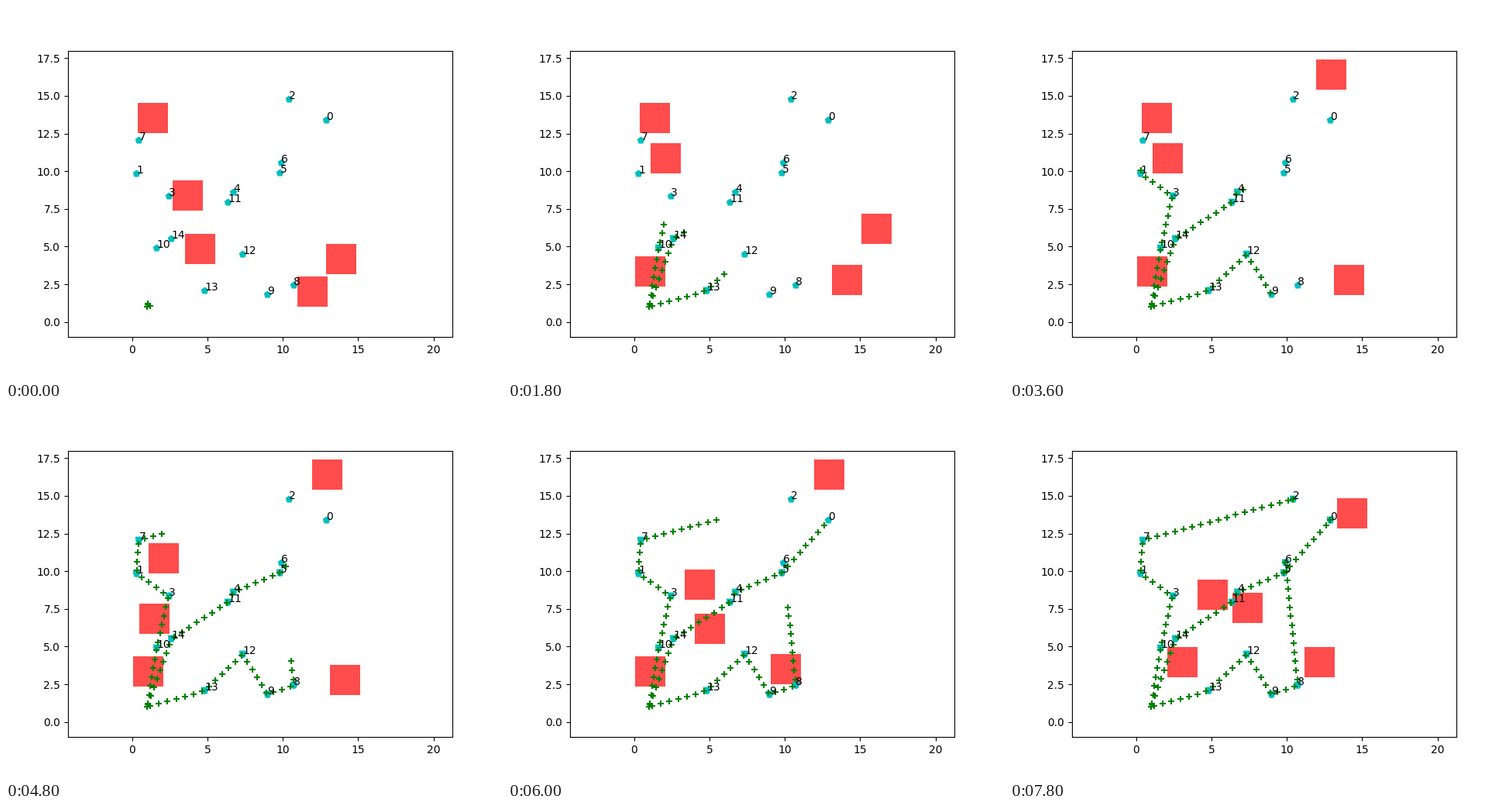
These frames come from a looping animation (640 by 480 pixels, 8 s). A matplotlib script:

```python
import math

import matplotlib.pyplot as plt
import numpy as np
from matplotlib.animation import FuncAnimation
from matplotlib.patches import Rectangle

INTERVAL = 200
FRAMES = 40
HOLD = 3            # frames per visible update
STEP = 0.2          # distance covered in one sub-step
MARK_EVERY = 3      # sub-steps between trail marks
MARK_RATE = 2.9     # trail marks per update
ROBOTS = 3
START = (1, 1)

TARGETS = [
    (12.89, 13.38), (0.29, 9.84), (10.42, 14.78), (2.41, 8.35), (6.72, 8.60),
    (9.81, 9.89), (9.91, 10.60), (0.45, 12.05), (10.73, 2.44), (8.98, 1.85),
    (1.63, 4.90), (6.36, 7.93), (7.33, 4.49), (4.82, 2.07), (2.61, 5.52),
]

# Obstacles rest at a lower left corner until they jump: {update: corner}.
OBSTACLES = [
    {0: (0.38, 12.53), 8: (0.47, 5.83), 10: (4.05, 5.18), 13: (4.07, 7.44)},
    {0: (2.69, 7.39), 1: (0.33, 7.18), 3: (1.10, 9.86), 10: (3.36, 8.11),
     11: (0.89, 8.62), 13: (6.39, 6.57)},
    {0: (3.51, 3.84), 2: (0.07, 2.35), 11: (2.07, 2.97)},
    {0: (12.87, 3.17), 2: (15.08, 5.18), 5: (15.18, 2.45), 6: (11.94, 15.41),
     11: (13.33, 12.86)},
    {0: (10.97, 1.02), 3: (13.13, 1.79), 10: (9.06, 2.51), 13: (11.17, 2.97)},
]


def leg(a, b):
    """Positions from a to b, one per sub-step, without a itself."""
    length = math.dist(a, b)
    count = round(length / STEP)
    ts = [min(j * STEP / length, 1) for j in range(1, count + 1)]
    return [(a[0] + t * (b[0] - a[0]), a[1] + t * (b[1] - a[1])) for t in ts]


def plan():
    """Whichever robot is free first takes the nearest target left."""
    paths = [[START] for _ in range(ROBOTS)]
    ends = [START] * ROBOTS
    arrivals = {}
    free = set(TARGETS)
    while free:
        _, _, r, target = min((len(paths[r]), math.dist(ends[r], t), r, t)
                              for r in range(ROBOTS) for t in free)
        paths[r] += leg(ends[r], target)
        ends[r] = target
        arrivals[target] = len(paths[r]) - 1
        free.remove(target)
    for path, end in zip(paths, ends):
        path[-1] = end
    return paths, arrivals


def trail(path, now):
    """Marks left so far, with one on the last target once it is reached."""
    marks = path[:1] + path[1:now + 1:MARK_EVERY]
    return marks + path[-1:] if now >= len(path) else marks


def offsets(points):
    return np.array(points, dtype=float).reshape(-1, 2)


PATHS, ARRIVALS = plan()

fig, ax = plt.subplots(figsize=(6.4, 4.8), dpi=100)
scale = 369.6 / 19
half = 496 / scale / 2
ax.set_xlim(8.5 - half, 8.5 + half)
ax.set_ylim(-1, 18)
ax.set_xticks(range(0, 21, 5))
ax.set_yticks([2.5 * i for i in range(8)])
ax.set_autoscale_on(False)

squares = [ax.add_patch(Rectangle(moves[0], 2, 2, color="r", alpha=0.7, lw=0))
           for moves in OBSTACLES]
ax.scatter(*zip(*TARGETS), c="c", marker="p", zorder=2)
visited = ax.scatter([], [], c="c", marker="v", zorder=2)
marks = ax.scatter([], [], c="g", marker="+", zorder=2)
for number, (x, y) in enumerate(TARGETS):
    ax.text(x, y, str(number))


def update(frame):
    k = frame // HOLD
    now = 1 + MARK_EVERY * int(MARK_RATE * k + 0.45)
    for square, moves in zip(squares, OBSTACLES):
        square.set_xy(moves[max(m for m in moves if m <= k)])
    marks.set_offsets(offsets([p for path in PATHS for p in trail(path, now)]))
    visited.set_offsets(offsets([t for t, s in ARRIVALS.items() if s < now]))
    return [*squares, visited, marks]


anim = FuncAnimation(fig, update, frames=FRAMES, interval=INTERVAL,
                     repeat=True, repeat_delay=0, blit=False)
plt.show()
```
